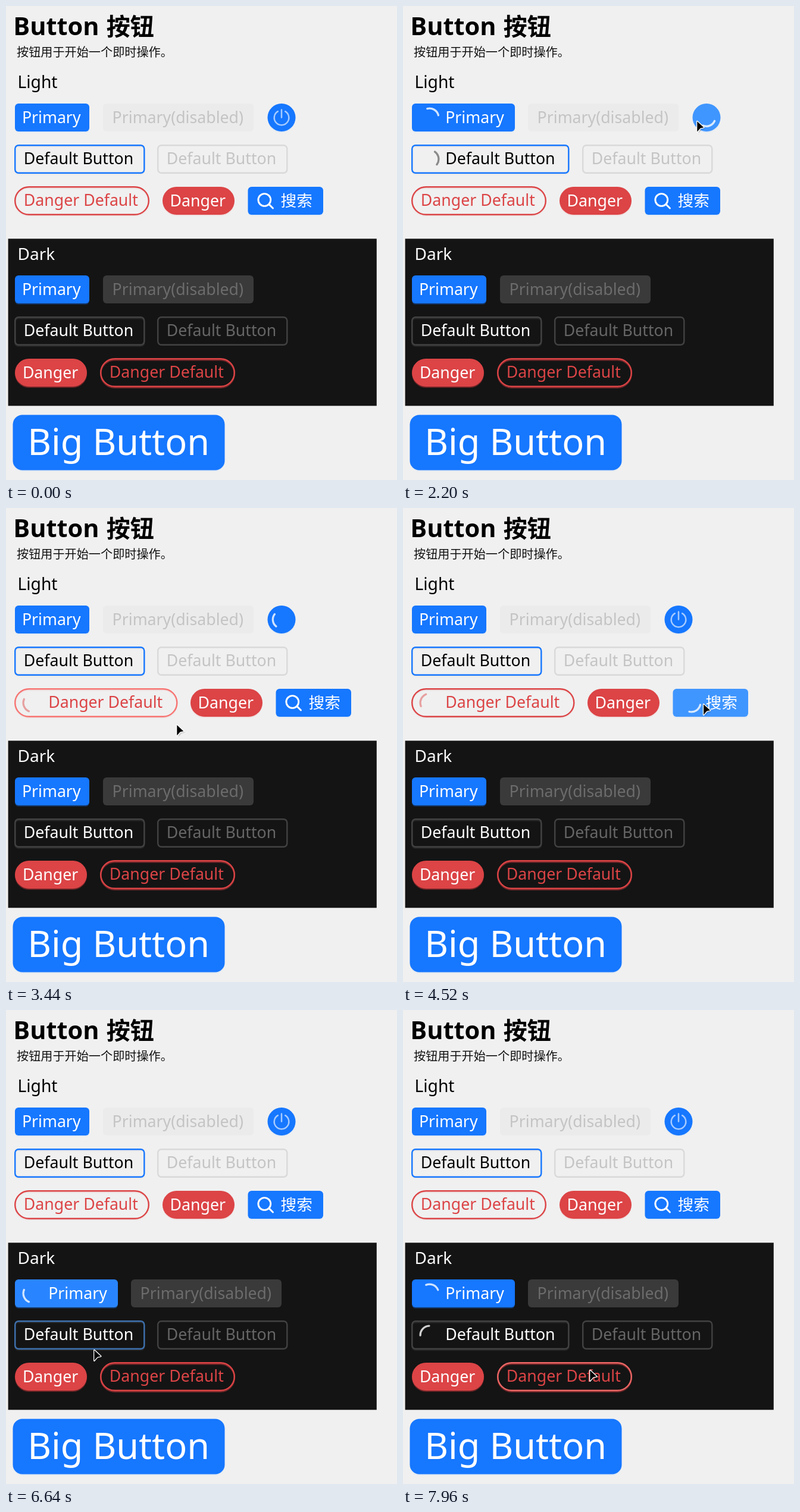
Recreate the animation shown at these times as an HTML page. Size 657 px wide and 797 px high, loop 8000 ms.

```html
<!DOCTYPE html>
<html lang="zh">
<head>
<meta charset="utf-8">
<title>Button</title>
<style>
html, body { margin: 0; width: 100%; height: 100%; overflow: hidden; background: #f0f0f0; }
svg { display: block; width: 657px; height: 797px; }
text { font-family: "Noto Sans", "Noto Sans CJK SC", "Noto Sans CJK", sans-serif; white-space: pre; }
</style>
</head>
<body>
<svg id="stage" viewBox="0 0 657 797" xmlns="http://www.w3.org/2000/svg"></svg>
<script>
const LOOP = 8000, STEP = 40, LOADING = 2000, TURN = 960, FADE = 240, SHIFT = 47;
const stage = document.getElementById('stage');

function add(parent, tag, attrs, content) {
  const el = document.createElementNS('http://www.w3.org/2000/svg', tag);
  for (const k in attrs) el.setAttribute(k, attrs[k]);
  if (content) el.textContent = content;
  parent.appendChild(el);
  return el;
}
const label = (parent, x, y, size, fill, content, weight = 400) =>
  add(parent, 'text', { x, y, 'font-size': size, fill, 'font-weight': weight }, content);

const rgb = hex => [1, 3, 5].map(i => parseInt(hex.slice(i, i + 2), 16));
function mix(a, b, k) {
  const p = rgb(a), q = rgb(b);
  return `rgb(${p.map((v, i) => Math.round(v + (q[i] - v) * k))})`;
}

// Looks: solid or outlined, with hover colour, text, spinner and shadow colours
const BLUE = '#1677ff', BLUE_HOVER = '#4096ff', RED = '#dc4446', RED_HOVER = '#fa7977';
const looks = {
  primary: { color: BLUE, hover: BLUE_HOVER, text: '#ffffff', spin: '#ffffff', shadow: '#e1e9f3' },
  disabled: { color: '#ebebeb', text: '#c4c4c4' },
  plain: { line: 1, color: BLUE, hover: BLUE_HOVER, text: '#000000', spin: '#707070', shadow: '#e8e8e8' },
  plainOff: { line: 1, color: '#d9d9d9', text: '#c4c4c4' },
  dangerLine: { line: 1, color: RED, hover: RED_HOVER, text: RED, spin: '#e58c8c', shadow: '#eee4e4' },
  danger: { color: RED, hover: RED_HOVER, text: '#ffffff', shadow: '#f0dfdf' },
  darkPrimary: { color: BLUE, hover: BLUE_HOVER, text: '#ffffff', spin: '#ffffff', shadow: '#15325b' },
  darkDisabled: { color: '#3a3a3a', text: '#6c6c6c' },
  darkPlain: { line: 1, color: '#424242', hover: '#3c89e8', text: '#ffffff', spin: '#ffffff', shadow: '#262626' },
  darkPlainOff: { line: 1, color: '#424242', text: '#666666' },
  darkDanger: { color: RED, hover: RED_HOVER, text: '#ffffff', shadow: '#6b2426' },
  darkDangerLine: { line: 1, color: RED, hover: '#ee6b69', text: RED, shadow: '#742729' }
};

const buttons = [];
function button(look, x, y, w, caption, textX, more = {}) {
  const s = looks[look], h = more.h || (s.line ? 49 : 47);
  const b = { s, x, y, w, h, textX, start: Infinity, grow: 0, ...more };
  const inset = s.line ? 1.2 : 0;
  const box = { x: inset, y: inset, height: h - 2 * inset, rx: more.r || 6, 'stroke-width': 2.4, fill: 'none' };
  b.g = add(stage, 'g', {});
  b.boxes = [];
  if (s.shadow) b.boxes.push(add(b.g, 'rect', { ...box, [s.line ? 'stroke' : 'fill']: s.shadow, transform: 'translate(0 2)' }));
  b.face = add(b.g, 'rect', box);
  b.boxes.push(b.face);
  b.inset = inset;
  if (caption) b.label = label(b.g, textX, b.base || h / 2 + (s.line ? 8.7 : 9), b.size || 26.7, s.text, caption);
  if (b.icon) b.iconEl = b.icon(b.g);
  if (b.start < Infinity) {
    const r = b.spinR || 15.4, a = 8 * Math.PI / 180, e = 98 * Math.PI / 180;
    b.spinX = b.spinX || (s.line ? 30.5 : 29.5);
    b.spinner = add(b.g, 'path', {
      d: `M${r * Math.cos(a)} ${r * Math.sin(a)}A${r} ${r} 0 0 1 ${r * Math.cos(e)} ${r * Math.sin(e)}`,
      fill: 'none', stroke: s.spin, 'stroke-opacity': .8, 'stroke-width': 3.3, 'stroke-linecap': 'round'
    });
  }
  buttons.push(b);
  return b;
}

const iconPath = (g, d, attrs) => add(g, 'path', { d, fill: 'none', stroke: '#fff', 'stroke-linecap': 'round', ...attrs });
const powerIcon = g => iconPath(g, 'M23.5 10.5V23.5M17.4 13.2A12.3 12.3 0 1 0 29.6 13.2',
  { 'stroke-width': 2.5, 'stroke-opacity': .62 });
const searchIcon = g => iconPath(g, 'M38.2 22a10.4 10.4 0 1 1-20.8 0a10.4 10.4 0 1 1 20.8 0M35.6 29.6L42 36',
  { 'stroke-width': 2.9 });

label(stage, 12.3, 49, 41.5, '#000', 'Button ', 700);
label(stage, 168.7, 49, 40, '#000', '按钮', 700);
label(stage, 18, 84.5, 20.15, '#111', '按钮用于开始一个即时操作。');
label(stage, 19.5, 138, 28.2, '#000', 'Light');
add(stage, 'rect', { x: 3.6, y: 391.3, width: 619.2, height: 281, fill: '#141414' });
label(stage, 19.5, 427, 28, '#fff', 'Dark');

const after = lead => ({ lead });
const primary = button('primary', 15, 164, 125, 'Primary', 11.9, { start: 579, grow: 48 });
button('disabled', 163, 164, 253, 'Primary(disabled)', 15.6, after(primary));
button('primary', 439.5, 164, 47, '', 0,
  { lead: primary, r: 23.5, start: 2160, spinX: 23.5, spinR: 14.7, icon: powerIcon });
const plain = button('plain', 14, 233, 219.5, 'Default Button', 15.8, { start: 1405, grow: 46 });
button('plainOff', 254, 233, 219.5, 'Default Button', 15.8, after(plain));
const dangerLine = button('dangerLine', 14, 303, 227, 'Danger Default', 15.8, { start: 3160, grow: 47.5, r: 23.4 });
button('danger', 263, 304, 121, 'Danger', 12.6, { lead: dangerLine, r: 23.5 });
button('primary', 406.5, 304, 126.5, '搜索', 55,
  { lead: dangerLine, start: 4507, spinX: 31, icon: searchIcon, keepText: true });

const darkPrimary = button('darkPrimary', 15, 453, 125, 'Primary', 11.9, { start: 6360, grow: 48 });
button('darkDisabled', 163, 453, 253, 'Primary(disabled)', 15.6, after(darkPrimary));
const darkPlain = button('darkPlain', 14, 522, 219.5, 'Default Button', 15.8, { start: 7507, grow: 46 });
button('darkPlainOff', 254, 522, 219.5, 'Default Button', 15.8, after(darkPlain));
button('darkDanger', 15, 593, 121, 'Danger', 12.9, { r: 23.5 });
button('darkDangerLine', 158, 592, 227, 'Danger Default', 15.8, { r: 23.4 });
button('primary', 11.5, 687.5, 356, 'Big Button', 24.8, { h: 93, r: 16, size: 61.2, base: 67.3 });

// Pointer route: time, x, y
const route = [
  [80, 250, 457], [480, 92, 196], [840, 95, 200], [1000, 94, 208], [1280, 91, 265],
  [1560, 96, 269], [1960, 494, 194], [2240, 494, 194], [2520, 235, 325], [3300, 262, 335],
  [3440, 287, 365], [3700, 310, 379], [4100, 420, 378], [4240, 460, 352], [4480, 505, 330],
  [4840, 500, 334], [5080, 440, 350], [5280, 78, 482], [5480, 76, 484], [5640, 76, 485],
  [5900, 95, 548], [6200, 90, 488], [6440, 100, 495], [6640, 148, 572], [6800, 160, 619],
  [7000, 155, 617], [7280, 130, 550], [7600, 132, 552], [7880, 310, 602], [7960, 314, 606]
];
function pointerAt(t) {
  if (t < route[0][0]) return null;
  const i = route.findIndex(p => p[0] > t);
  if (i < 0) return route[route.length - 1].slice(1);
  const [t0, x0, y0] = route[i - 1], [t1, x1, y1] = route[i];
  const u = (t - t0) / (t1 - t0), k = u * u * (3 - 2 * u);
  return [x0 + (x1 - x0) * k, y0 + (y1 - y0) * k];
}

const arrow = add(stage, 'g', {});
const arrowShape = 'M0.3 0L11.3 10.2L5.6 11.4L0.3 17.6Z';
add(arrow, 'path', { d: arrowShape, fill: '#000', 'fill-opacity': .14, transform: 'translate(2.5 2.5)' });
add(arrow, 'path', {
  d: arrowShape, fill: '#000', stroke: '#fff', 'stroke-width': 2.6,
  'stroke-linejoin': 'round', 'paint-order': 'stroke'
});

const loading = (b, t) => t >= b.start && t < b.start + LOADING;
const leftOf = (b, t) => b.x + (b.lead && loading(b.lead, t) ? SHIFT : 0);
const widthOf = (b, t) => b.w + (loading(b, t) ? b.grow : 0);

function inside(b, t) {
  const p = pointerAt(t);
  if (!p) return false;
  const dx = p[0] - leftOf(b, t), dy = p[1] - b.y;
  return dx >= 0 && dx <= widthOf(b, t) && dy >= 0 && dy <= b.h;
}

// Share of the last FADE ms spent over the button, eased
function hoverLevel(b, t) {
  const n = 24;
  let hits = 0;
  for (let i = 0; i < n; i++) hits += inside(b, t - i * FADE / n);
  return Math.sin(hits / n * Math.PI / 2);
}

function draw(t) {
  for (const b of buttons) {
    const on = loading(b, t), left = leftOf(b, t), width = widthOf(b, t);
    b.g.setAttribute('transform', `translate(${left} ${b.y})`);
    for (const box of b.boxes) box.setAttribute('width', width - 2 * b.inset);
    const color = b.s.hover ? mix(b.s.color, b.s.hover, hoverLevel(b, t)) : b.s.color;
    b.face.setAttribute(b.s.line ? 'stroke' : 'fill', color);
    if (b.label && !b.keepText) b.label.setAttribute('x', on ? 71.2 - b.x : b.textX);
    if (b.iconEl) b.iconEl.style.display = on ? 'none' : '';
    if (b.spinner) {
      b.spinner.style.display = on ? '' : 'none';
      if (on) b.spinner.setAttribute('transform',
        `translate(${b.spinX} ${b.h / 2}) rotate(${(t - b.start) / TURN * 360})`);
    }
  }
  const p = pointerAt(t);
  arrow.style.display = p ? '' : 'none';
  if (p) arrow.setAttribute('transform', `translate(${p[0]} ${p[1]})`);
}

const began = performance.now();
function tick() {
  const t = (performance.now() - began) % LOOP;
  draw(Math.floor(t / STEP) * STEP);
  requestAnimationFrame(tick);
}
draw(0);
requestAnimationFrame(tick);
</script>
</body>
</html>
```
